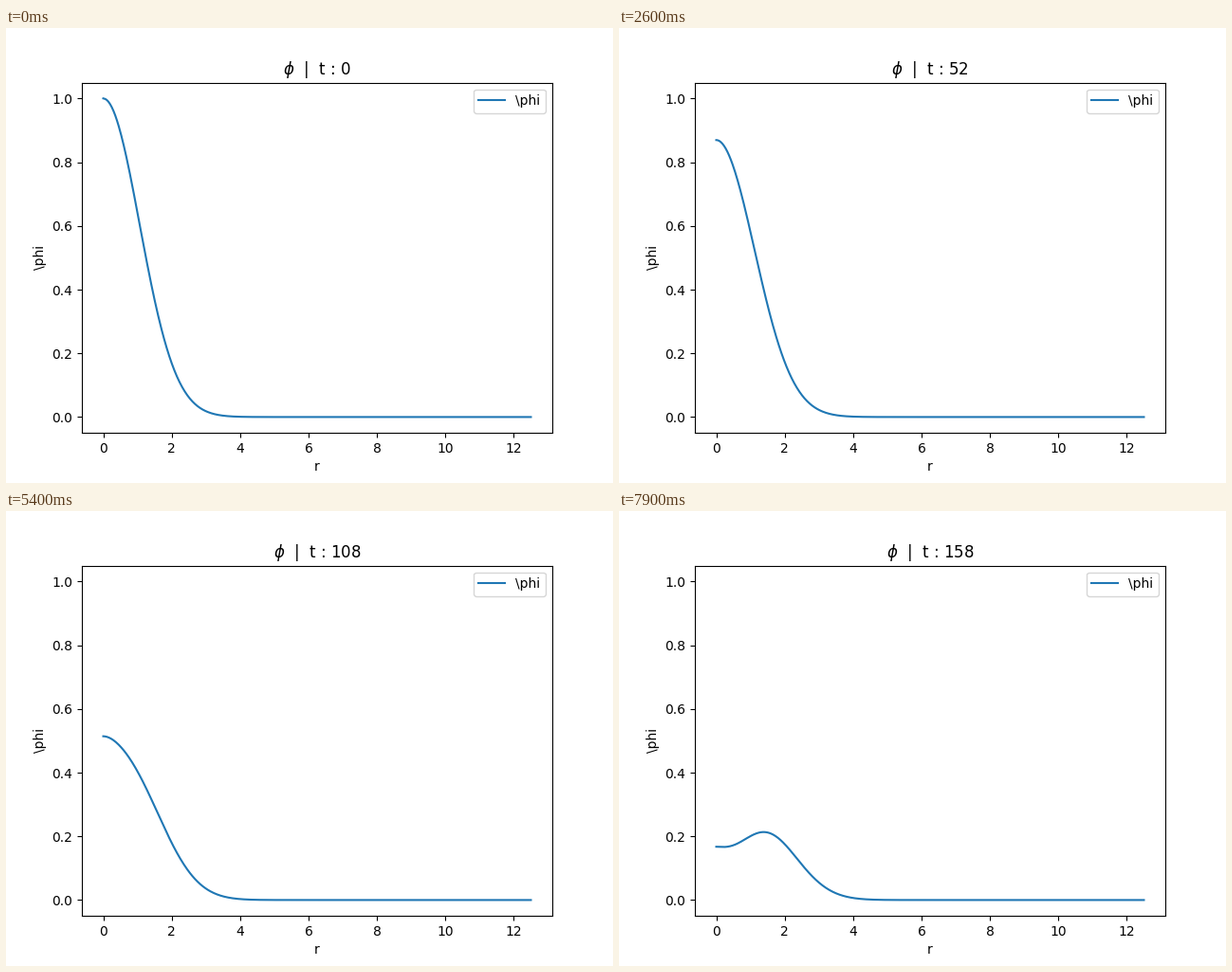
Write a matplotlib script that moves like this. It is 640x480 px and loops after 8000 ms.

```python
import numpy as np
import matplotlib.pyplot as plt
from matplotlib.animation import FuncAnimation

FRAMES = 80
STEPS = 2      # time steps per frame
DT = 0.00615
WIDTH = 1.5

r = np.linspace(1e-4, 12.5, 500)


def pulse(x):
    return x * np.exp(-(x / WIDTH) ** 2)


def field(t):
    """Spherical wave from a Gaussian, with a slower core near r = 0."""
    wave = (pulse(r + t) + pulse(r - t)) / (2 * r)
    s = t - 0.59
    lag = 0.08 * (s + np.sqrt(s * s + 0.006))
    return wave + lag * np.exp(-1.65 / (t + 1e-6) * r ** 1.75)


def title(step):
    return rf"$\phi$  |  t : {step}"


fig, ax = plt.subplots(figsize=(6.4, 4.8), dpi=100)
line, = ax.plot(r, field(0), label=r"\phi")
ax.set(xlim=(-0.625, 13.125), ylim=(-0.05, 1.05), xlabel="r", ylabel=r"\phi")
ax.set_title(title(0))
ax.legend(loc="upper right")


def update(i):
    step = i * STEPS
    line.set_ydata(field(step * DT))
    ax.set_title(title(step))
    return line, ax.title


anim = FuncAnimation(fig, update, frames=FRAMES, interval=100,
                     repeat=True, repeat_delay=0, blit=False)
plt.show()
```
